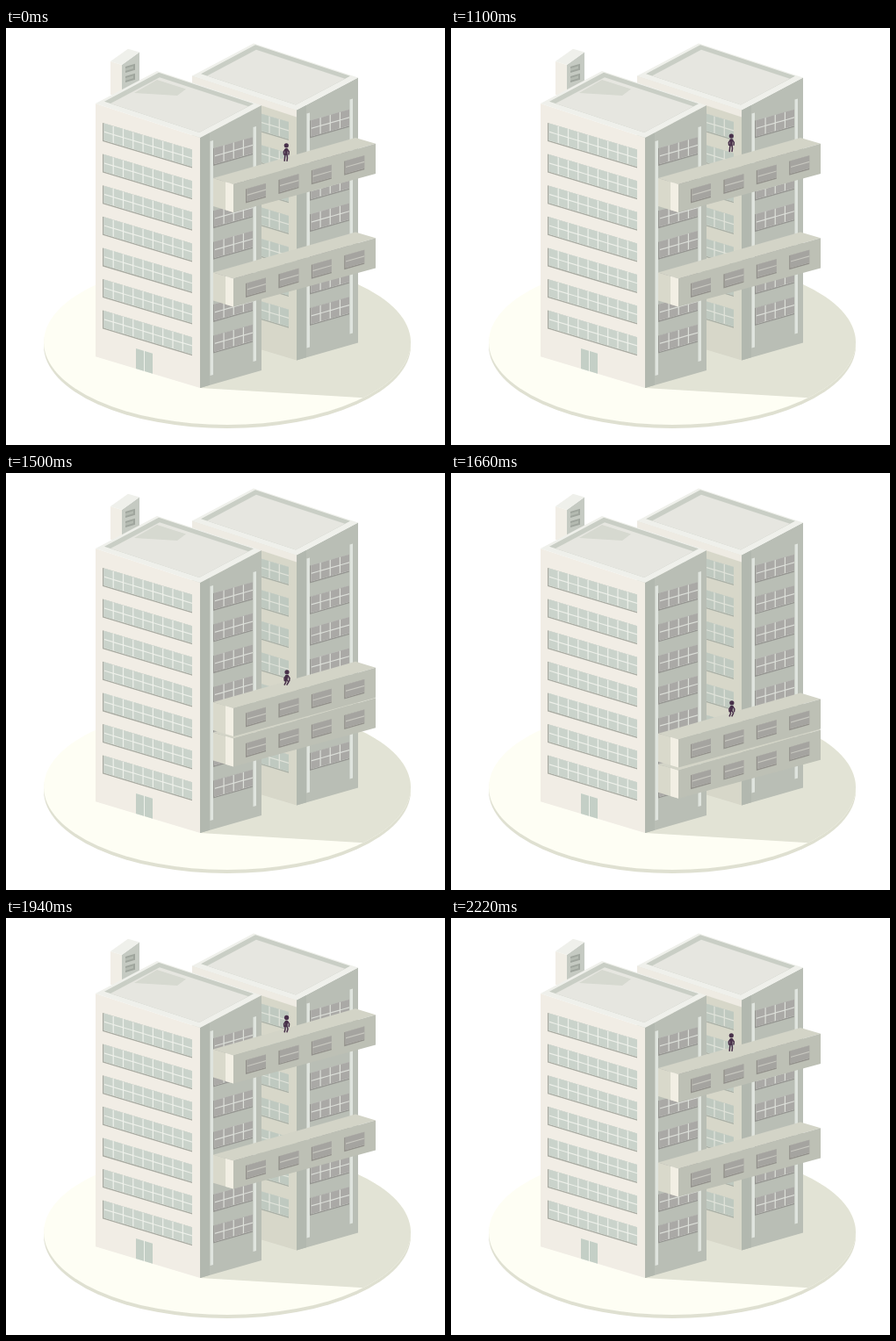
Animation, 500 px wide and 475 px high, one loop 3.02 s. Source, as an HTML page:

```html
<!DOCTYPE html>
<html lang="en">
<head>
<meta charset="utf-8">
<title>Bouncing bridges</title>
<style>
  html, body { margin: 0; width: 100%; height: 100%; overflow: hidden; background: #fff; }
  svg { display: block; width: 100vw; height: 100vh; }
</style>
</head>
<body>
<svg id="stage" viewBox="0 0 500 475"></svg>
<script>
const LOOP = 3020, MOVE_START = 700, MOVE_END = 2220, STEP = 40;
const FLOOR = 35.6, BRIDGE_GAP = 107.5, LEFT = 0.3, RIGHT = 0.285;

const repeat = (n, make) => Array.from({ length: n }, (_, i) => make(i)).join('');
const poly = (points, fill) => `<polygon points="${points}" fill="${fill}"/>`;
const rect = (x, y, w, h, fill) =>
  `<rect x="${x}" y="${y}" width="${w}" height="${h}" fill="${fill}"/>`;
const skew = (x, y, slope, content) =>
  `<g transform="matrix(1 ${slope} 0 1 ${x} ${y})">${content}</g>`;

// Wall running from the near edge (x, y) by w, rising towards the back.
function wall(x, y, w, h, topSlope, baseSlope, fill) {
  const far = Math.abs(w);
  return poly([x, y, x + w, y - far * topSlope,
    x + w, y + h - far * baseSlope, x, y + h], fill);
}

// Horizontal surface whose nearest corner is (x, y).
function slab(x, y, left, right, leftSlope, rightSlope, fill) {
  const dl = left * leftSlope, dr = right * rightSlope;
  return poly([x, y, x - left, y - dl, x - left + right, y - dl - dr,
    x + right, y - dr], fill);
}

// A window set back from the wall, showing its reveal at the left and bottom.
function windowGrid(w, h, cols, rows, { reveal, frame, pane }) {
  const left = 1.5, sill = 1.5, gap = 1.2;
  const cw = (w - left + gap) / cols, ch = (h - sill + gap) / rows;
  return rect(0, 0, w, h, reveal) + rect(left, 0, w - left, h - sill, frame)
    + repeat(rows, r => repeat(cols, c =>
      rect(left + c * cw, r * ch, cw - gap, ch - gap, pane)));
}

const LIT = { reveal: '#a9aba2', frame: '#eef0ea', pane: '#cad3cb' };
const SHADED = { reveal: '#aab0a6', frame: '#e0e3da', pane: '#bfc9c0' };
const SIDE = { reveal: '#959591', frame: '#dcdfd9', pane: '#aaa9a6' };
const BRIDGE = { reveal: '#92908b', frame: '#c8c8c0', pane: '#a5a4a0' };

function tower(front, glass) {
  const x = 221, y = 125, h = 285, roofLeft = 0.327, roofRight = 0.53;
  const pilaster = (dx, dy) => skew(x + dx, y + dy, -RIGHT, rect(0, 0, 3.5, 267, '#dfe4de'));
  return wall(x, y, -119, h, roofLeft, LEFT, front)
    + (glass === SHADED ? wall(x, y, -119, 8, roofLeft, roofLeft, '#eeebe3') : '')
    + wall(x, y, 70, h, roofRight, RIGHT, '#b9beb5')
    + wall(x, y, 11, h, roofRight, RIGHT, '#b2b8af')
    + repeat(7, i =>
      skew(110, 108 + i * FLOOR, LEFT, windowGrid(102, 21, 9, 2, glass))
      + skew(236, 137 + i * FLOOR, -RIGHT, windowGrid(45, 20, 4, 2, SIDE)))
    + pilaster(11.5, 4) + pilaster(60.5, -12)
    + slab(x, y, 119, 70, roofLeft, roofRight, '#eff0eb')
    + slab(x - 1, y - 6, 108, 62, roofLeft, roofRight, '#c9cec5')
    + slab(x - 1, y - 6, 101, 56, roofLeft, roofRight, '#e6e6e0');
}

const chimney = wall(132, 42, -13, 34, LEFT, 0, '#f1eee6')
  + wall(132, 42, 20, 34, 0.72, 0.5, '#c5cac2')
  + slab(132, 42, 13, 20, LEFT, 0.72, '#eff0eb')
  + repeat(2, i => skew(136, 44 + i * 11, -LEFT,
    rect(0, 0, 11, 7, '#9fa59d') + rect(0, 2, 9, 3, '#b4bab1')));

const door = skew(148, 365, LEFT, rect(0, 0, 19, 23, '#eef0ea')
  + repeat(2, i => rect(i * 10, 0, 9, 23, '#c4cfc6')));

const ground = `<clipPath id="disc"><ellipse cx="252" cy="358" rx="209" ry="94"/></clipPath>
  <ellipse cx="252" cy="362" rx="209" ry="94" fill="#dfe0d1"/>
  <g clip-path="url(#disc)">${rect(40, 260, 425, 200, '#fefef4')}
  ${poly('221,410 470,425 470,250 221,250', '#e2e3d5')}</g>`;

const bridge = slab(259, 178, 23, 162, LEFT, RIGHT, '#d3d4c7')
  + wall(259, 178, -23, 32, LEFT, LEFT, '#d9d9cb')
  + wall(259, 178, -9, 32, LEFT, LEFT, '#f2efe4')
  + wall(259, 178, 162, 32, RIGHT, 0.272, '#bdc0b5')
  + repeat(4, i => skew(273 + i * 37.4, 183.5 - i * 10.6, -RIGHT,
    windowGrid(23, 16, 1, 2, BRIDGE)));

const stage = document.getElementById('stage');
stage.innerHTML = ground
  + `<g transform="translate(110 -31.5)">${tower('#d7d7c9', SHADED)}</g>`
  + chimney + tower('#f1ede5', LIT)
  + poly('172,59 205,69.5 195,77 146,74', '#d6d9d0') + door
  + `<g id="lower">${bridge}</g><g id="upper">${bridge}</g>
  <g id="person" fill="none" stroke="#48304a" stroke-linecap="round" stroke-linejoin="round">
    <path id="limbs" stroke-width="1.5"/><path id="torso" stroke-width="3.2"/>
    <circle id="head" r="2.6" fill="#48304a" stroke="none"/>
  </g>`;

const [lower, upper, person, limbs, torso, head] =
  ['lower', 'upper', 'person', 'limbs', 'torso', 'head'].map(id => document.getElementById(id));

const TAKEOFF = 1000, LANDING = 1240, IMPACT = 1220, BOTTOM = 1640;
const DEPTH = 127, CONTACT = 73;

const progress = (t, from, to) => Math.min(1, Math.max(0, (t - from) / (to - from)));
const swing = u => (1 - Math.cos(Math.PI * u)) / 2;

const fall = t => DEPTH * (1 - (1 - progress(t, IMPACT, BOTTOM)) ** 1.12);

// Swing back up past the resting place, then settle.
function rebound(t, depth, overshoot, top) {
  return t < top
    ? depth - (depth + overshoot) * swing(progress(t, BOTTOM, top))
    : -overshoot * (1 - swing(progress(t, top, MOVE_END)));
}

function upperDrop(t) {
  return t < BOTTOM ? fall(t) : rebound(t, DEPTH, 23, 1960);
}

function lowerDrop(t) {
  return t < BOTTOM ? Math.max(0, fall(t) - CONTACT) : rebound(t, DEPTH - CONTACT, 9, 1920);
}

function hop(t) {
  const u = progress(t, TAKEOFF, LANDING);
  return -44 * u * (1 - u);
}

function crouch(t) {
  const windUp = Math.sin(Math.PI * progress(t, 670, TAKEOFF));
  const landed = progress(t, IMPACT, IMPACT + 80) * (1 - progress(t, IMPACT, MOVE_END));
  return 5 * (windUp + landed);
}

const shift = (node, y) => node.setAttribute('transform', `translate(0 ${y})`);

function draw(time) {
  const t = time < MOVE_START ? 0
    : Math.min(MOVE_END, MOVE_START + Math.floor((time - MOVE_START) / STEP) * STEP);
  const drop = upperDrop(t), c = crouch(t);
  shift(upper, drop);
  shift(lower, BRIDGE_GAP + lowerDrop(t));
  shift(person, drop + hop(t));

  const hip = 144 + c * 0.5, neck = 138 + c * 0.8, lean = c * 0.2;
  const arm = side => `M${319.3 + side + lean} ${neck}l${side * 2} 3l${-side * 0.3} 3`;
  const leg = side =>
    `M${319 + side} ${hip}L${319 + side * 1.5 + lean * 2} 148L${318.6 + side * 1.4} 151.3`;
  head.setAttribute('cx', 319.3 + lean);
  head.setAttribute('cy', 133.8 + c * 0.85);
  torso.setAttribute('d', `M${319.3 + lean} ${neck + 0.5}L319 ${hip - 0.5}`);
  limbs.setAttribute('d', arm(-1) + arm(1) + leg(-1) + leg(1));
}

const begin = performance.now();
function frame() {
  draw((performance.now() - begin) % LOOP);
  requestAnimationFrame(frame);
}
frame();
</script>
</body>
</html>
```
